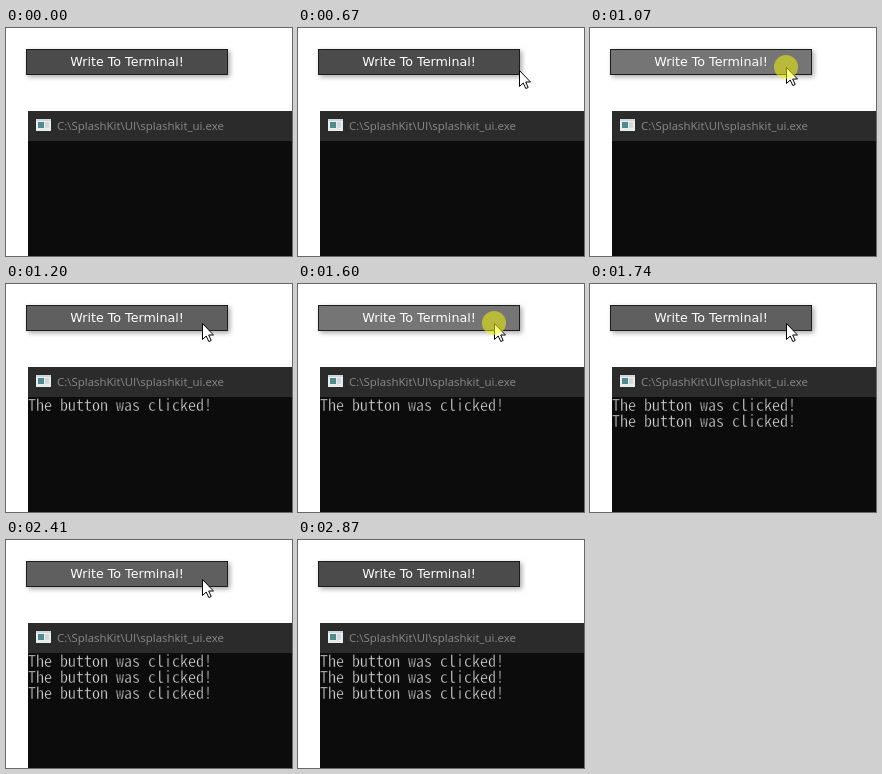
Animation of 286 by 228 pixels, one loop 3.5 s. Source, as an HTML page:

```html
<!DOCTYPE html>
<html lang="en">
<head>
<meta charset="utf-8">
<title>Write To Terminal</title>
<style>
  html, body { margin: 0; width: 100%; height: 100%; overflow: hidden; background: #fff; }
  svg { display: block; width: 286px; height: 228px; }

  .btn-text { font: 12.7px "DejaVu Sans", sans-serif; fill: #fff; text-anchor: middle; }
  .title { font: 11.45px "Open Sans", sans-serif; fill: #8a8a8a; }
  /* the background-coloured stroke thins the letters */
  .line {
    font: 300 16px "Noto Sans Mono CJK JP", "Noto Sans Mono CJK SC", "Noto Sans CJK JP", monospace;
    fill: #d6d6d6; stroke: #0c0c0c; stroke-width: .35px;
  }

  .face, .line, .click, .cursor { animation: 3500ms step-end infinite; }
  .face { animation-name: face; }
  .click { animation-name: click; }
  .cursor { animation-name: cursor; }
  .one { animation-name: one; }
  .two { animation-name: two; }
  .three { animation-name: three; }

  @keyframes face {
    0% { fill: #4b4b4b; }
    21.14% { fill: #5f5f5f; }
    30.57% { fill: #757575; }
    34.28% { fill: #5f5f5f; }
    45.71% { fill: #757575; }
    49.71% { fill: #5f5f5f; }
    64.85% { fill: #757575; }
    68.85% { fill: #5f5f5f; }
    82%, 100% { fill: #4b4b4b; }
  }
  @keyframes click {
    0% { opacity: 0; }
    30.57% { opacity: .5; }
    34.28% { opacity: 0; }
    45.71% { opacity: .5; }
    49.71% { opacity: 0; }
    64.85% { opacity: .5; }
    68.85%, 100% { opacity: 0; }
  }
  @keyframes cursor {
    0% { transform: translate(300px, 43px); }
    15.14% { transform: translate(265px, 43px); }
    17.14% { transform: translate(241px, 43px); }
    19.14% { transform: translate(221px, 42px); }
    21.14% { transform: translate(207px, 41px); }
    22.85% { transform: translate(199px, 40px); }
    24.85% { transform: translate(196px, 39px); }
    80.28% { transform: translate(215px, 36px); }
    82%, 100% { transform: translate(300px, 30px); }
  }
  @keyframes one { 0% { opacity: 0; } 32.28%, 100% { opacity: 1; } }
  @keyframes two { 0% { opacity: 0; } 47.71%, 100% { opacity: 1; } }
  @keyframes three { 0% { opacity: 0; } 64.85%, 100% { opacity: 1; } }
</style>
</head>
<body>
<svg viewBox="0 0 286 228">
  <defs>
    <filter id="blur" x="-10%" y="-60%" width="120%" height="220%">
      <feGaussianBlur stdDeviation="2.7"/>
    </filter>
  </defs>

  <!-- Button -->
  <rect x="22" y="23" width="202" height="26" fill="#000" opacity=".34" filter="url(#blur)"/>
  <rect class="face" x="20.5" y="21.5" width="201" height="25" fill="#4b4b4b" stroke="#1c1c1c"/>
  <text class="btn-text" x="121" y="38">Write To Terminal!</text>

  <!-- Terminal window -->
  <rect x="22" y="83" width="264" height="30" fill="#2b2b2b"/>
  <rect x="22" y="113" width="264" height="115" fill="#0c0c0c"/>
  <rect x="30" y="91" width="15" height="12" fill="#e9eded"/>
  <rect x="30" y="91" width="15" height="2" fill="#cfd6d8"/>
  <rect x="32" y="94" width="6" height="6" fill="#4f8b8e"/>
  <rect x="39" y="94" width="4" height="6" fill="#d3dada"/>
  <text class="title" x="51" y="102">C:\SplashKit\UI\splashkit_ui.exe</text>
  <text class="line one" x="22" y="127">The button was clicked!</text>
  <text class="line two" x="22" y="143">The button was clicked!</text>
  <text class="line three" x="22" y="159">The button was clicked!</text>

  <!-- Pointer -->
  <path class="cursor" d="M.5 .5V16.5L4.2 13L6.8 18.5L9.2 17.5L6.7 12H11.5Z" fill="#fff" stroke="#000"/>
  <circle class="click" cx="196" cy="39" r="12" fill="#ff0"/>
</svg>
</body>
</html>
```
